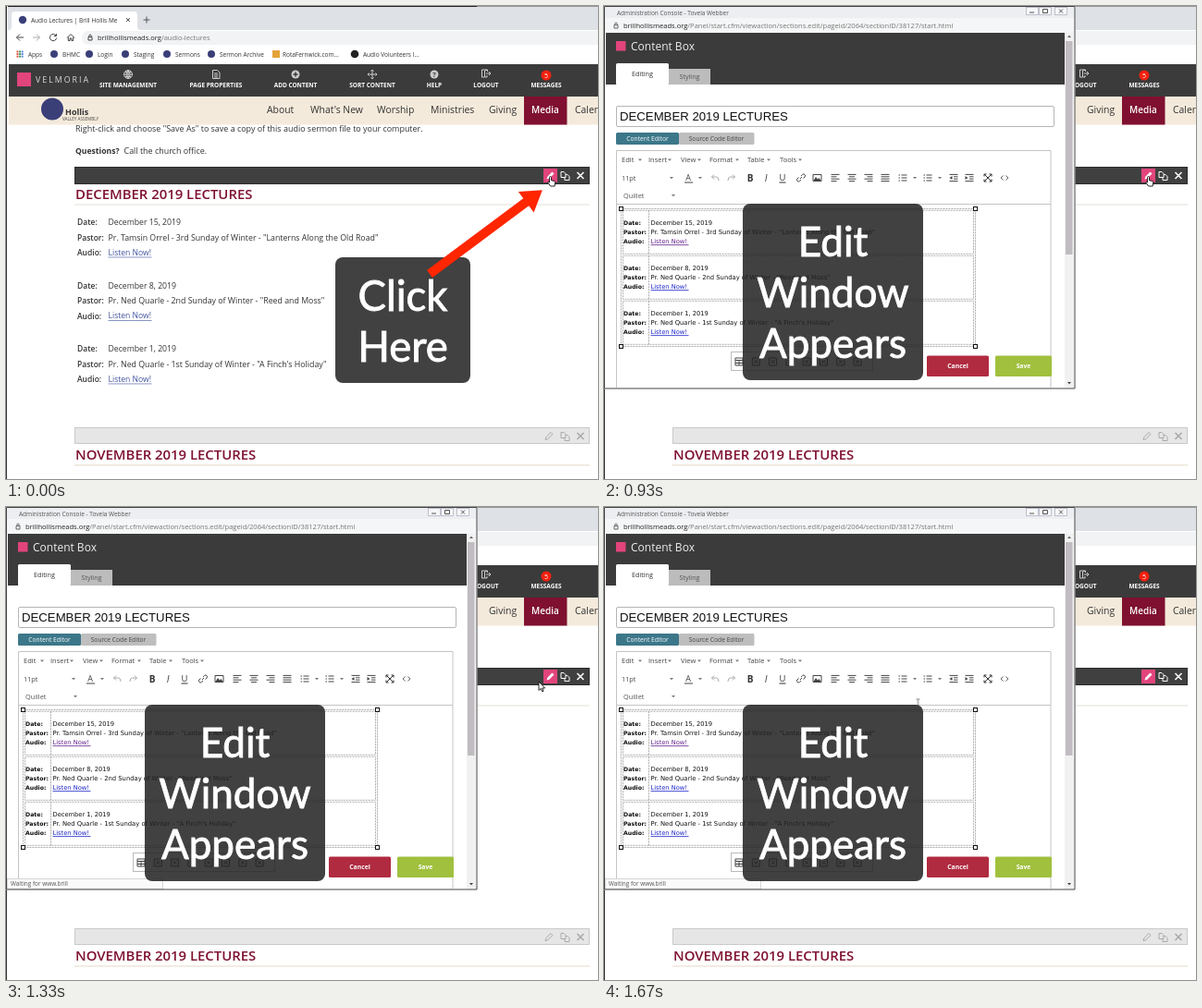
An HTML page that plays this animation: 640x512 px, repeating every 1.73 s.

```html
<!DOCTYPE html>
<html lang="en">
<head>
<meta charset="utf-8">
<title>Edit window tutorial</title>
<style>
html, body { margin: 0; width: 100%; height: 100%; overflow: hidden; background: #fff; }
svg { display: block; width: 100vw; height: 100vh; font-family: "Open Sans", sans-serif; }
.mid { text-anchor: middle; }
.bold { font-weight: 700; }
.semi { font-weight: 600; }
.italic { font-style: italic; }
.arial { font-family: "Liberation Sans", sans-serif; }
.wide { font-family: "DejaVu Sans", sans-serif; }
.label { font-family: Lato, sans-serif; text-anchor: middle; stroke: #fff; stroke-width: .9; }
.brand { letter-spacing: 2px; }
.icon { fill: none; stroke-width: 1; }

#prompt, #editor, #status, #hand, #arrow, #beam { animation: 1730ms step-end infinite; }
#prompt { animation-name: prompt; }
#editor { animation-name: editor; }
#status { animation-name: status; }
#hand { animation-name: hand; }
#arrow { animation-name: arrow; }
#beam { animation-name: beam; }
@keyframes prompt { 0% { visibility: visible } 50.289%, 100% { visibility: hidden } }
@keyframes editor { 0% { visibility: hidden } 50.289%, 100% { visibility: visible } }
@keyframes status { 0% { opacity: 0 } 61.85% { opacity: .5 } 69.364%, 100% { opacity: 1 } }
@keyframes hand { 0% { visibility: visible } 76.879%, 100% { visibility: hidden } }
@keyframes arrow {
  0% { visibility: hidden; transform: translate(576px, 189px) }
  76.879% { visibility: visible; transform: translate(576px, 189px) }
  80.925% { visibility: visible; transform: translate(514.5px, 197px) }
  84.971% { visibility: visible; transform: translate(456px, 205px) }
  88.439%, 100% { visibility: hidden; transform: translate(411px, 213px) }
}
@keyframes beam {
  0% { visibility: hidden; transform: translate(411px, 214.5px) }
  88.439% { visibility: visible; transform: translate(411px, 214.5px) }
  92.486% { visibility: visible; transform: translate(365px, 214.5px) }
  96.532%, 100% { visibility: visible; transform: translate(339.5px, 214.5px) }
}
</style>
</head>
<body>
<svg id="stage" viewBox="0 0 640 512" preserveAspectRatio="none"></svg>
<script>
const text = (x, y, size, str, fill = '#333', cls = '') =>
  `<text x="${x}" y="${y}" font-size="${size}" fill="${fill}" class="${cls}">${str}</text>`;
const rect = (x, y, w, h, fill, more = '') =>
  `<rect x="${x}" y="${y}" width="${w}" height="${h}" fill="${fill}" ${more}/>`;
const dot = (x, y, r, fill) => `<circle cx="${x}" cy="${y}" r="${r}" fill="${fill}"/>`;
const icon = (x, y, d, color = '#444', more = '') =>
  `<path class="icon" transform="translate(${x} ${y})" d="${d}" stroke="${color}" ${more}/>`;
const shape = (x, y, d, fill) => `<path transform="translate(${x} ${y})" d="${d}" fill="${fill}"/>`;
const caret = (x, y) => shape(x, y, 'M-2-1h4l-2 2.2z', '#777');
const many = (items, draw) => items.map(draw).join('');

const HEADING = 'DECEMBER 2019 LECTURES';
const SITE = 'brillhollismeads.org';
const MAROON = '#7f1030', PINK = '#e2447c', NAVY = '#3b3f78', DARK = '#3b3b3b';
const CROSS = 'M-3.5-3.5l7 7M3.5-3.5l-7 7';
const COPY = 'M-4-4h3l2 2v4h-5zM1-1h2l2 2v4h-5v-3';
const PENCIL = 'M-4 4l.8-2.8 5.2-5.2 2 2-5.2 5.2z';
const LOCK = 'M-2-.5h4v3.5h-4zM-1.2-.5v-1.2a1.2 1.2 0 0 1 2.4 0v1.2';

const talks = [
  ['December 15, 2019', 'Pr. Tamsin Orrel - 3rd Sunday of Winter - "Lanterns Along the Old Road"'],
  ['December 8, 2019', 'Pr. Ned Quarle - 2nd Sunday of Winter - "Reed and Moss"'],
  ['December 1, 2019', 'Pr. Ned Quarle - 1st Sunday of Winter - "A Finch\'s Holiday"'],
];

function browser() {
  const bookmarks = [[61, 'BHMC'], [99, 'Login'], [138, 'Staging'], [183, 'Sermons'], [231, 'Sermon Archive']];
  return rect(2, 0, 638, 26, '#dee1e6') + rect(2, 0, 507, 1, '#222') + rect(509, 0, 131, 1, '#999') +
    `<path d="M3 26q3 0 3-4v-12q0-4 4-4h128q4 0 4 4v12q0 4 3 4z" fill="#fff"/>` +
    dot(18, 15, 4.2, NAVY) + text(27, 17.6, 6.5, 'Audio Lectures | Brill Hollis Me') +
    icon(132, 15, 'M-2-2l4 4M2-2l-4 4', '#555') + icon(152, 15, 'M-3.5 0h7M0-3.5v7', '#555') +
    rect(82, 27, 570, 15, '#f1f3f4', 'rx="7"') +
    icon(15, 34, 'M4 0h-7.5M0-3.5L-3.5 0 0 3.5') +
    icon(33, 34, 'M-4 0h7.5M0-3.5L3.5 0 0 3.5', '#aaa') +
    icon(51, 34, 'M3-2a3.6 3.6 0 1 0 .6 2.6M3.4-4v2.6h-2.6') +
    icon(70, 34, 'M-4 .5L0-3.5 4 .5M-2.7-.5v4h1.8v-2.5h1.8v2.5h1.8v-4') +
    icon(91, 34, LOCK) +
    text(99, 37, 7.5, `${SITE}<tspan fill="#777">/audio-lectures</tspan>`, '#222') +
    many([0, 1, 2, 3, 4, 5, 6, 7, 8], i =>
      rect(11.5 + i % 3 * 2.6, 48.5 + (i / 3 | 0) * 2.6, 1.9, 1.9, ['#e04b3a', '#3b9a55', '#4a7fe0'][i % 3])) +
    text(24, 54.6, 6.5, 'Apps') +
    many(bookmarks, ([x, s]) => dot(x - 9, 52, 4, NAVY) + text(x, 54.6, 6.5, s)) +
    rect(288, 48, 8, 8, '#e5a33a') + text(299, 54.6, 6.5, 'RotaFernwick.com...') +
    dot(377, 52, 4.3, '#222') + text(386, 54.6, 6.5, 'Audio Volunteers I...');
}

function adminBar() {
  const gray = '#ccc';
  const items = [[132, 'SITE MANAGEMENT'], [227, 'PAGE PROPERTIES'], [313, 'ADD CONTENT'],
    [396, 'SORT CONTENT'], [463, 'HELP'], [519, 'LOGOUT'], [584, 'MESSAGES']];
  return rect(3, 63, 637, 35, DARK) + rect(12, 72, 15, 15, PINK) +
    text(32, 83, 8.8, 'VELMORIA', '#ddd', 'brand') +
    many(items, ([x, s]) => text(x, 88, 6.5, s, '#fff', 'mid bold')) +
    icon(132, 74, 'M-4.5 0a4.5 4.5 0 1 0 9 0a4.5 4.5 0 1 0-9 0h9M0-4.5v9M-3.5-2.5h7M-3.5 2.5h7M0-4.5q-4 4.5 0 9q4-4.5 0-9', gray) +
    icon(227, 74, 'M-3.5-4.5h5l2.5 2.5v6.5h-7.5zM-2-1h4M-2 1h4M-2 3h4', gray) +
    dot(313, 74, 4.5, gray) + icon(313, 74, 'M-2.5 0h5M0-2.5v5', DARK, 'style="stroke-width:1.5"') +
    icon(396, 74, 'M-5 0h10M0-5v10M-3.5-1.5L-5 0l1.5 1.5M3.5-1.5L5 0 3.5 1.5M-1.5-3.5L0-5l1.5 1.5M-1.5 3.5L0 5l1.5-1.5', gray) +
    dot(463, 74, 4.5, gray) + text(463, 76.8, 7.5, '?', DARK, 'mid bold') +
    icon(519, 73, 'M1-4h-5.5v8h3v-7l3-1v2M-1 4h2v-2M0 0h5M3-2l2 2-2 2', gray) +
    dot(584, 75, 5.5, '#f3200f') + text(584, 77.5, 7, '5', '#fff', 'mid');
}

function siteNav() {
  const links = [[282, 'About'], [329, "What's New"], [401, 'Worship'], [459, 'Ministries'], [522, 'Giving'], [615, 'Calendar']];
  return rect(3, 98, 637, 30.5, '#f4eadb') + dot(50, 111.5, 12, NAVY) +
    text(64, 117.5, 9, 'Hollis', '#333', 'bold') + text(61, 124.3, 4.6, 'VALLEY ASSEMBLY', '#444') +
    rect(560, 98, 46.5, 30.5, MAROON) + text(568, 116, 10, 'Media', '#fff', 'semi') +
    many(links, ([x, s]) => text(x, 116, 10.4, s));
}

function page() {
  const entry = ([date, title], i) => {
    const y = 237 + i * 68.5;
    return many(['Date:', 'Pastor:', 'Audio:'], (s, k) => text(77, y + k * 16.5, 8.5, s, '#333', 'semi')) +
      text(110.5, y, 8.7, date) + text(110.5, y + 16.5, 8.8, title) +
      text(110.5, y + 32.5, 8.6, 'Listen Now!', '#4355a0') + rect(110.5, y + 34.5, 47, .9, '#7c89c0');
  };
  const tools = (y, color) => icon(604, y, COPY, color) + icon(621, y, CROSS, color, 'style="stroke-width:1.6"');
  return text(75, 136, 8.95, 'Right-click and choose "Save As" to save a copy of this audio sermon file to your computer.') +
    text(75, 160, 8.6, 'Questions?', '#333', 'bold') + text(127.5, 160, 8.95, 'Call the church office.') +
    rect(74.5, 174.5, 556, 18, '#404040', 'stroke="#2c2c2c"') + rect(581, 176, 15, 15, PINK) +
    shape(588.5, 183.5, PENCIL, '#fff') + tools(183.5, '#fff') +
    text(75, 209, 14.9, HEADING, MAROON, 'semi') + rect(74, 214.5, 557, 1, '#e4dfd8') +
    many(talks, entry) +
    rect(74.5, 456.5, 556, 17, '#e6e6e6', 'stroke="#c9c9c9"') +
    icon(587, 465.5, PENCIL, '#aaa') + tools(465.5, '#aaa') +
    text(75, 491, 14.9, HEADING.replace('DECEM', 'NOVEM'), MAROON, 'semi') + rect(74, 496.5, 557, 1, '#e4d9c8') +
    rect(0, 0, 1, 512, '#333');
}

const callout = (x, y, w, h, lines, size, first, step) =>
  rect(x, y, w, h, '#222', 'rx="8" opacity=".86"') +
  many(lines, (s, i) => text(x + w / 2, first + i * step, size, s, '#fff', 'label'));

function prompt() {
  return callout(356, 272, 146, 136, ['Click', 'Here'], 45.5, 330, 54.5) +
    `<path transform="translate(458 290) rotate(-36.7)" d="M0-5H130V-14L152 0 130 14V5H0z" fill="#ff2600"/>`;
}

function toolbar() {
  const menus = [[19, 39, 'Edit'], [48, 71, 'Insert'], [83, 103, 'View'], [114, 144, 'Format'], [155, 178, 'Table'], [190, 212, 'Tools']];
  const lines = shift => [0, 1, 2, 3].map(i => `M${i % 2 ? shift : -4.5} ${i * 2.4 - 3.6}h${i % 2 ? 6 : 9}`).join('');
  const bullets = 'M-4.5-3h1.5M-4.5 0h1.5M-4.5 3h1.5M-1.5-3h6M-1.5 0h6M-1.5 3h6';
  const indent = 'M-4.5-3.6h9M0-1.2h4.5M0 1.2h4.5M-4.5 3.6h9';
  return many(menus, ([x, c, s]) => text(x, 169, 7.5, s, '#444') + caret(c, 166.5)) +
    text(19, 188.5, 7.3, '11pt', '#444') + many([73, 104, 336, 363], x => caret(x, 186)) +
    text(91, 189, 9, 'A', '#444', 'mid') + rect(87, 190.5, 9, 1, '#444') +
    icon(120, 186, 'M-3.5-1h5q2.5 0 2.5 4M-1-3.5L-3.5-1l2.5 2.5', '#aaa') +
    icon(138, 186, 'M3.5-1h-5q-2.5 0-2.5 4M1-3.5L3.5-1l-2.5 2.5', '#aaa') +
    text(158, 189.7, 10, 'B', '#333', 'mid bold') + text(175, 189.7, 10, 'I', '#333', 'mid italic') +
    text(193, 189, 9.5, 'U', '#333', 'mid') + rect(189.5, 190.5, 7, 1, '#333') +
    icon(213, 186, 'M-1 1L1-1M0-2l1.5-1.5a1.7 1.7 0 0 1 2.5 2.5L2.5.5M0 2l-1.5 1.5a1.7 1.7 0 0 1-2.5-2.5L-2.5-.5') +
    icon(230.5, 186, 'M-4.5-3.5h9v7h-9z') + shape(230.5, 186, 'M-4 3l2.5-4 2 2.5 1.5-1.5 2 3z', '#444') +
    many([[250, -4.5], [268, -3], [286, -1.5]], ([x, s]) => icon(x, 186, lines(s))) +
    icon(304, 186, 'M-4.5-3.6h9M-4.5-1.2h9M-4.5 1.2h9M-4.5 3.6h9') +
    icon(323, 186, bullets) + icon(350, 186, bullets) +
    icon(378, 186, indent) + shape(378, 186, 'M-4.5 0l3-2v4z', '#444') +
    icon(395, 186, indent) + shape(395, 186, 'M-1.5 0l-3-2v4z', '#444') +
    icon(415, 186, 'M-4-1.5v-2.5h2.5M4-1.5v-2.5h-2.5M-4 1.5v2.5h2.5M4 1.5v2.5h-2.5M-4-4l8 8M4-4l-8 8', '#333') +
    icon(433, 186, 'M-1.5-2.5L-4 0l2.5 2.5M1.5-2.5L4 0 1.5 2.5', '#666') +
    text(21, 207.5, 7.3, 'Quillet', '#555') + caret(75, 205);
}

function content() {
  const dashed = 'stroke="#999" stroke-width=".8" stroke-dasharray="2 1"';
  const entry = ([date, title], i) => {
    const y = 237.3 + i * 49, link = i ? '#1a22c8' : '#63208f';
    return rect(20.5, y - 16, 379, 47, 'none', dashed) + `<path d="M48.5 ${y - 16}v47" ${dashed}/>` +
      many(['Date:', 'Pastor:', 'Audio:'], (s, k) => text(21, y + k * 10, 6.2, s, '#111', 'wide bold')) +
      text(50.5, y, 6.7, date, '#111', 'wide') + text(50.5, y + 10, 6.8, title, '#111', 'wide') +
      text(50.5, y + 20, 6.7, 'Listen Now!', link, 'wide') + rect(50.5, y + 21, 41, .8, link);
  };
  return rect(18.5, 219.5, 383, 149, 'none', dashed) + many(talks, entry) +
    many([[18, 219], [401, 219], [18, 368], [401, 368]], ([x, y]) => rect(x - 1.5, y - 1.5, 4, 4, '#fff', 'stroke="#111"'));
}

function editor() {
  return rect(0, 0, 509.5, 414.5, '#fff') + rect(1, 1, 508, 12, '#eceef1') + rect(1, 13, 508, 16, '#f5f6f7') +
    text(14, 10, 6.5, 'Administration Console - Tovela Webber', '#555') +
    many([456, 470, 487], x => rect(x + .5, 1.5, 13, 8, '#f6f7f9', 'stroke="#aab" stroke-width=".7"')) +
    icon(462.5, 6, 'M-2.5 1h5', '#555') + icon(477, 5.5, 'M-2.5-2h5v4h-5z', '#555') + icon(494, 5.5, 'M-2-2l4 4M2-2l-4 4', '#555') +
    icon(13, 21, LOCK, '#666') +
    text(21, 24, 7.55, `${SITE}<tspan fill="#777">/Panel/start.cfm/viewaction/sections.edit/pageid/2064/sectionID/38127/start.html</tspan>`, '#222') +
    rect(2, 29, 496, 56, DARK) + rect(13, 38, 10.5, 10.5, PINK) + text(29, 48, 12, 'Content Box', '#eee') +
    rect(13, 62, 57, 23.5, '#fff', 'rx="1.5"') + text(41.5, 76, 7.2, 'Editing', '#333', 'mid') +
    rect(70, 68, 45, 17, '#bcbcbc') + text(92.5, 79, 7.2, 'Styling', '#555', 'mid') +
    rect(498, 29, 10, 384, '#f1f1f1') + rect(499, 38, 7.5, 231, '#c1bcc1') +
    shape(503, 33, 'M-2 1h4l-2-2.5z', '#666') + shape(503, 408, 'M-2-1h4l-2 2.5z', '#444') +
    rect(13.5, 108.5, 473, 22, '#fff', 'stroke="#b5b5b5" rx="1.5"') + text(17, 124, 13.2, HEADING, '#111', 'arial') +
    rect(13, 137, 68, 13, '#3c7789', 'rx="1.5"') + text(47, 146, 6.7, 'Content Editor', '#fff', 'mid') +
    rect(81, 137, 81.5, 13, '#bebebe', 'rx="1.5"') + text(121.5, 146, 6.7, 'Source Code Editor', '#444', 'mid') +
    `<path d="M13.5 413V156.5H483V413M13.5 214.5H483" fill="none" stroke="#c4c4c4"/>` +
    toolbar() + content() +
    rect(137.5, 374.5, 153, 20, '#fff', 'stroke="#bbb"') +
    many([0, 1, 2, 3, 4, 5, 6, 7], i => icon(146 + i * 18.3, 385, i ? 'M-4-4h8v8h-8zM-2-2l4 4M2-2l-4 4' : 'M-4-4h8v8h-8zM-4-1.5h8M-4 1.5h8M0-1.5v5.5')) +
    rect(349, 378.5, 67, 22.5, '#b02b40', 'rx="1.5"') + text(382.5, 392, 6.8, 'Cancel', '#fff', 'mid bold') +
    rect(423, 378.5, 61, 22.5, '#a0c03e', 'rx="1.5"') + text(453.5, 392, 6.8, 'Save', '#fff', 'mid bold') +
    `<g id="status">${rect(1.5, 402.5, 168, 11, '#fafafa', 'stroke="#d5d5d5"')}${text(5, 410, 6.4, 'Waiting for www.brill', '#555')}</g>` +
    callout(150, 214, 195, 191, ['Edit', 'Window', 'Appears'], 44, 271, 55) +
    `<path d="M.5 414V.5H509V414z" fill="none" stroke="#444"/>`;
}

const cursors =
  `<path id="hand" d="M587.5 185.7q0-1.2 1-1.2t1 1.2v3l3.4.8q.9.3.9 1.2l-.6 4.3h-4.6l-2.6-3.6q-.3-1 .6-1l.9.6z" fill="#fff" stroke="#111" stroke-width=".9"/>
  <path id="arrow" d="M0 0v9.500l2.200-2 1.500 3.300 1.400-.6-1.400-3.200h2.900z" fill="#fff" stroke="#111" stroke-width=".9"/>
  <path id="beam" class="icon" d="M-2-6.500h1.500l.5.500.5-.5h1.500M0-6v12M-2 6.500h1.500l.5-.5.5.5h1.500" stroke="#444" style="stroke-width:.7"/>`;

document.getElementById('stage').innerHTML =
  browser() + page() + adminBar() + siteNav() +
  `<g id="prompt">${prompt()}</g><g id="editor">${editor()}</g>` + cursors;
</script>
</body>
</html>
```
